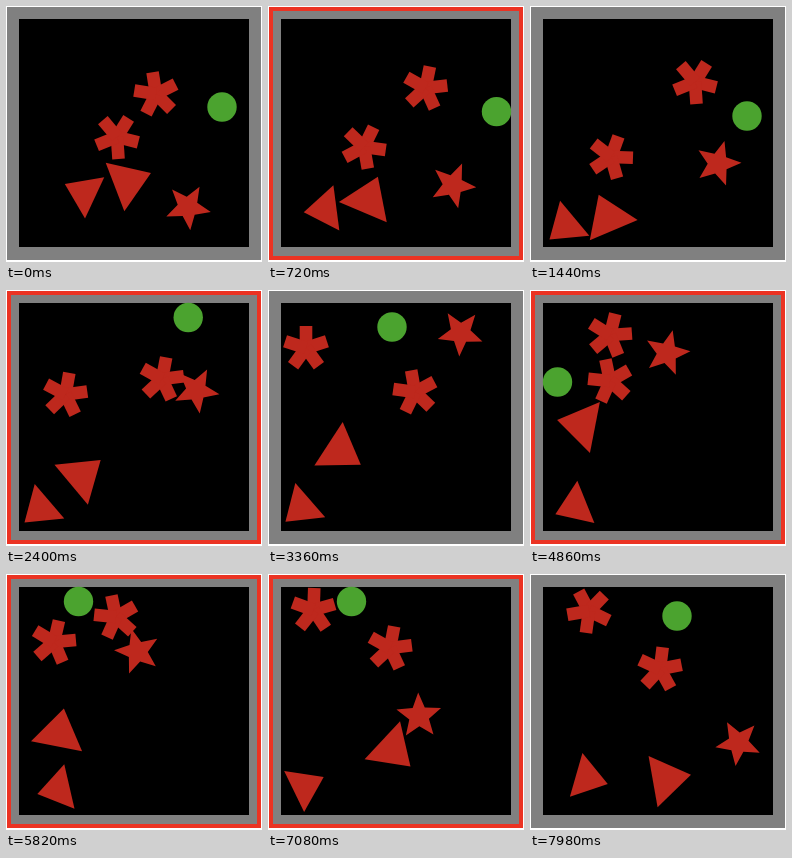
Animation, 256 px wide and 256 px high, one loop 8 s. Source, as an HTML page with a canvas:

```html
<!DOCTYPE html>
<html lang="en">
<head>
<meta charset="utf-8">
<title>Drifting shapes</title>
<style>
html, body { margin: 0; width: 100%; height: 100%; overflow: hidden; background: #fff; }
canvas { display: block; width: 100vw; height: 100vh; }
</style>
</head>
<body>
<canvas id="stage" width="256" height="256"></canvas>
<script>
const ctx = document.getElementById("stage").getContext("2d");
const LOOP = 8000, STEP = 60, RED = "#be281d", GREEN = "#4ba32f";
const MARKS = [0, 1440, 3360, 4860, 5820, 7080, 7980];
const WALL = { left: 27.5, right: 228.5, top: 27.5 };

// Each pose is x, y, rotation in degrees, at the matching mark.
const atMarks = poses => poses.map((pose, i) => [MARKS[i], ...pose]);

const shapes = [
  { draw: () => triangle(32.9, 45.5), path: atMarks([
    [78.7, 187.3, 205], [36.3, 219.3, 140], [34, 217.3, 139], [45.7, 216, 158],
    [52.7, 215, 167], [36, 212.7, 334], [56.7, 204, 376]]) },
  { draw: () => triangle(38.5, 52), path: atMarks([
    [121, 176.3, -21], [78.7, 212.3, -113], [71.3, 160.7, 33], [52.3, 135, 191],
    [53, 159.7, 281], [123.7, 175, 403], [135.7, 205.3, 350]]) },
  { draw: star, path: atMarks([
    [181.8, 201, -60], [188, 157.5, -74], [192.5, 43, -51], [137, 63, -76],
    [131.5, 77.5, -105], [151, 142, -92], [208.4, 168.8, -119]]) },
  { draw: asterisk, path: atMarks([
    [150, 88, -99], [165, 76, -58], [147, 102, -100], [80, 91, -102],
    [48, 68, -77], [45.5, 36, -88], [59, 37, -118]]) },
  { draw: asterisk, path: atMarks([
    [111, 131, -58], [81, 151, -70], [38, 58, -90], [80, 45, -76],
    [110, 43, -102], [122, 74, -79], [130, 95, -83]]) }
];
// The fourth shape bounces off the left wall between two marks.
shapes[3].path.splice(5, 0, [6240, 34, 57, -81]);

// Time, x, y of the ball, including its contacts with the walls.
const ballPath = [
  [0, 216, 101], [600, WALL.right, 105], [960, WALL.right, 107], [1440, 217, 110],
  [2280, 190, WALL.top], [2820, 155, WALL.top], [3360, 124, 37],
  [3720, 98, WALL.top], [3960, 80, WALL.top], [4560, WALL.left, 72],
  [4860, WALL.left, 92], [5160, WALL.left, 78], [5640, 62, WALL.top],
  [5820, 72.5, WALL.top], [6060, 80, WALL.top], [6360, 82, 34],
  [6660, 80, WALL.top], [7080, 83.5, WALL.top], [7500, 113, WALL.top], [7980, 147, 42]
];

function poseAt(path, time) {
  const next = path.findIndex(key => key[0] > time);
  if (next < 0) return path.at(-1).slice(1);
  const from = path[next - 1], to = path[next];
  const part = (time - from[0]) / (to[0] - from[0]);
  return from.slice(1).map((value, i) => value + (to[i + 1] - value) * part);
}

function fillPolygon(points) {
  ctx.beginPath();
  points.forEach(([x, y]) => ctx.lineTo(x, y));
  ctx.fill();
}

function triangle(height, base) {
  fillPolygon([[height * 2 / 3, 0], [-height / 3, base / 2], [-height / 3, -base / 2]]);
}

function star() {
  fillPolygon(Array.from({ length: 10 }, (_, i) => {
    const radius = i % 2 ? 10.3 : 23.5, angle = i * Math.PI / 5;
    return [radius * Math.cos(angle), radius * Math.sin(angle)];
  }));
}

function asterisk() {
  for (let arm = 0; arm < 5; arm++) {
    ctx.fillRect(0, -6.3, 22, 12.6);
    ctx.rotate(Math.PI * 2 / 5);
  }
}

function rect(color, left, top, right, bottom) {
  ctx.fillStyle = color;
  ctx.fillRect(left, top, right - left, bottom - top);
}

function render(time) {
  const [ballX, ballY] = poseAt(ballPath, time);
  const touching = ballX <= WALL.left || ballX >= WALL.right || ballY <= WALL.top;

  rect("#fff", 0, 0, 256, 256);
  rect(touching ? "#eb3323" : "#808080", 1, 1, 255, 254);
  if (touching) rect("#808080", 5, 5, 251, 250);
  rect("#000", 13, 13, 243, 241);

  ctx.fillStyle = RED;
  for (const { draw, path } of shapes) {
    const [x, y, degrees] = poseAt(path, time);
    ctx.save();
    ctx.translate(x, y);
    ctx.rotate(degrees * Math.PI / 180);
    draw();
    ctx.restore();
  }

  ctx.fillStyle = GREEN;
  ctx.beginPath();
  ctx.arc(ballX, ballY, 14.7, 0, Math.PI * 2);
  ctx.fill();
}

const start = performance.now();
function tick() {
  const time = (performance.now() - start) % LOOP;
  render(Math.floor(time / STEP) * STEP);
  requestAnimationFrame(tick);
}
tick();
</script>
</body>
</html>
```
